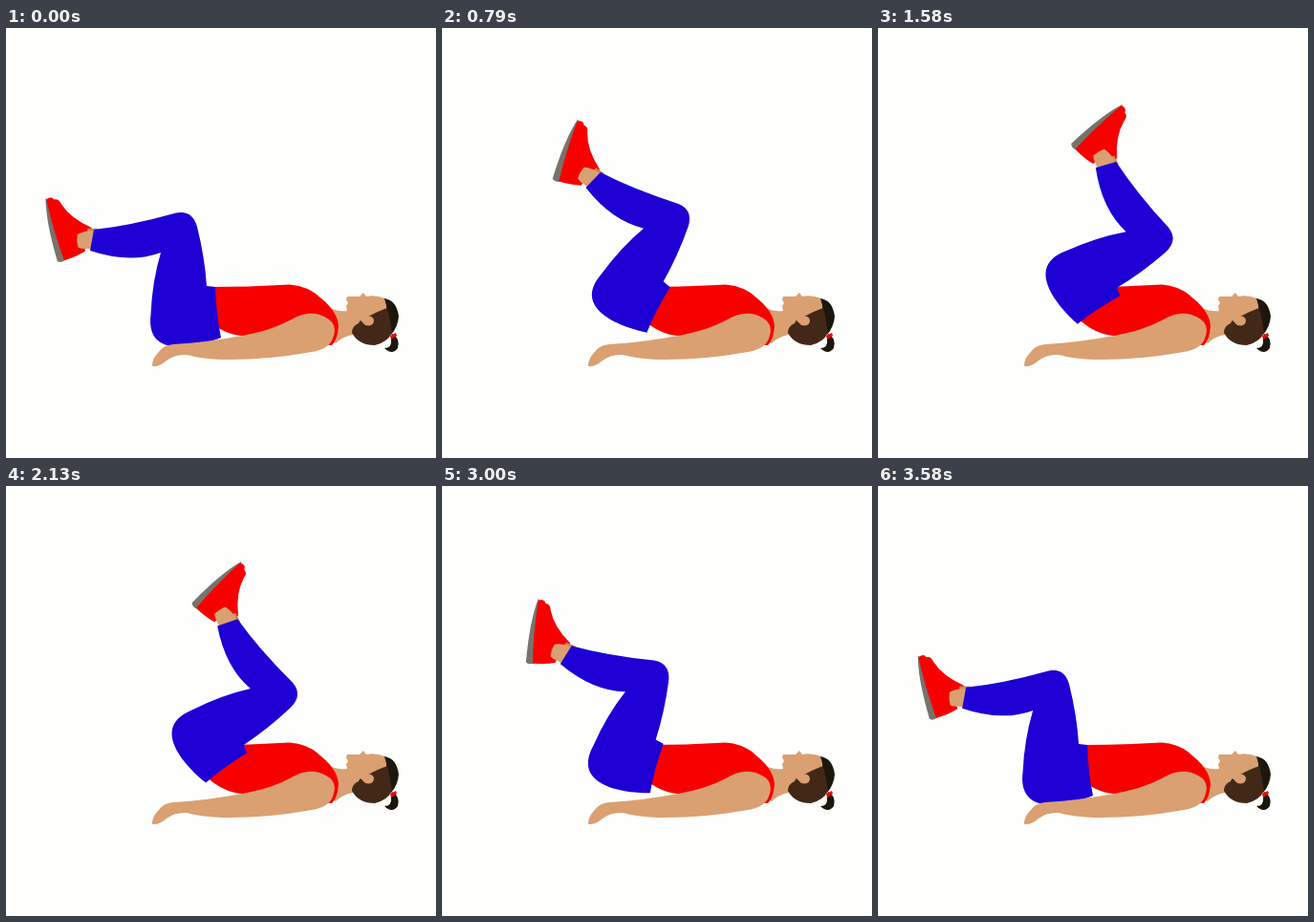
Animation of 450 by 450 pixels, one loop 3620 ms. Source, as an HTML page:

```html
<!DOCTYPE html>
<html lang="en">
<head>
<meta charset="utf-8">
<title>Reverse crunch</title>
<style>
  html, body { margin: 0; width: 100%; height: 100%; overflow: hidden; background: #fefefc; }
  svg { display: block; width: 100vw; height: 100vh; }
  .skin { fill: #daa072; }
  .red { fill: #f80000; }
  .blue { fill: #1e00d4; }
  .brown { fill: #432818; }
  .dark { fill: #1c170c; }
</style>
</head>
<body>
<svg viewBox="0 0 450 450">
  <!-- neck and head -->
  <path class="skin" d="M330 287Q343 298 357 296L356 291L358 288L356 284L357 281L370 281L374 277L377 281Q386 279 397 283L402 300L385 318L363 321Q352 323 345 330L325 320Z"/>
  <path class="dark" d="M396 283Q409 285 411 302Q410 313 403 321L394 312Q402 298 396 283Z"/>
  <path class="brown" d="M399 293Q390 296 379 302Q371 303 369 309Q362 312 362 319Q369 332 386 332Q399 329 404 319Q402 306 399 293Z"/>
  <path class="skin" d="M369 304Q384 298 385 306Q385 313 376 311Z"/>
  <path class="dark" d="M404 320Q413 325 410 335Q404 343 396 335Q404 335 403 326Z"/>
  <path class="red" d="M402 322L408 319L409 322L403 326Z"/>

  <path class="red" d="M212 271Q255 271 297 268.5Q317 270 330 283Q347 297 348 312Q347 326 341 332L300 330L247 322Q228 321 209 304Z"/>

  <!-- the bent leg turns as one piece around the hip -->
  <g id="leg">
    <g transform="translate(90 222) rotate(-16.5)">
      <path fill="#77736c" d="M-34 -56Q-41 -32 -41 11Q-38 14 -33 12L-31 -53Z"/>
      <path class="red" d="M-34 12Q-36 -20 -34 -53Q-32 -56 -29 -55Q-27 -55 -26 -52Q-21 -52 -20 -45Q-15 -28 3 -13L4 -8L-8 -5L-10 9Q-20 12 -34 12Z"/>
      <path fill="#c58a58" d="M-1 -13L9 -10L6 -2L-4 -6Z"/>
      <path class="skin" d="M-13 -10Q-5 -12 4 -9L-1 10L-8 7Q-13 6 -16 3Q-16 -4 -13 -10Z"/>
    </g>
    <path class="blue" d="M92 211Q130 207 178 193.5Q195 190 200 208Q208 240 210 270L219 271Q220 300 225 324C195 336 146 345 151.5 300Q153 265 162 235Q130 247 88 233Z"/>
  </g>

  <path class="skin" d="M153 352Q154 345 159 340Q164 332 175 331Q210 329 247 322Q276 317 297 306Q318 293 335 303Q348 310 342 325Q338 336 320 339Q270 348 225 347Q203 346 189 342Q177 341 168 348Q161 354 155 354Q152 354 153 352Z"/>
</svg>
<script>
const PERIOD = 3620, RISE = 1520, LOWER_AT = 1800;
const SWING = 63, HIP = '228.6 303.7';
const leg = document.getElementById('leg');

const ease = u => (1 - Math.cos(Math.PI * u)) / 2;

// Rises, rests at the top, then lowers with a slower start
function curl(t) {
  if (t < LOWER_AT) return ease(Math.min(t / RISE, 1));
  return 1 - ease(((t - LOWER_AT) / (PERIOD - LOWER_AT)) ** 1.22);
}

function draw() {
  const angle = SWING * curl(performance.now() % PERIOD);
  leg.setAttribute('transform', `rotate(${angle} ${HIP})`);
  requestAnimationFrame(draw);
}
draw();
</script>
</body>
</html>
```
